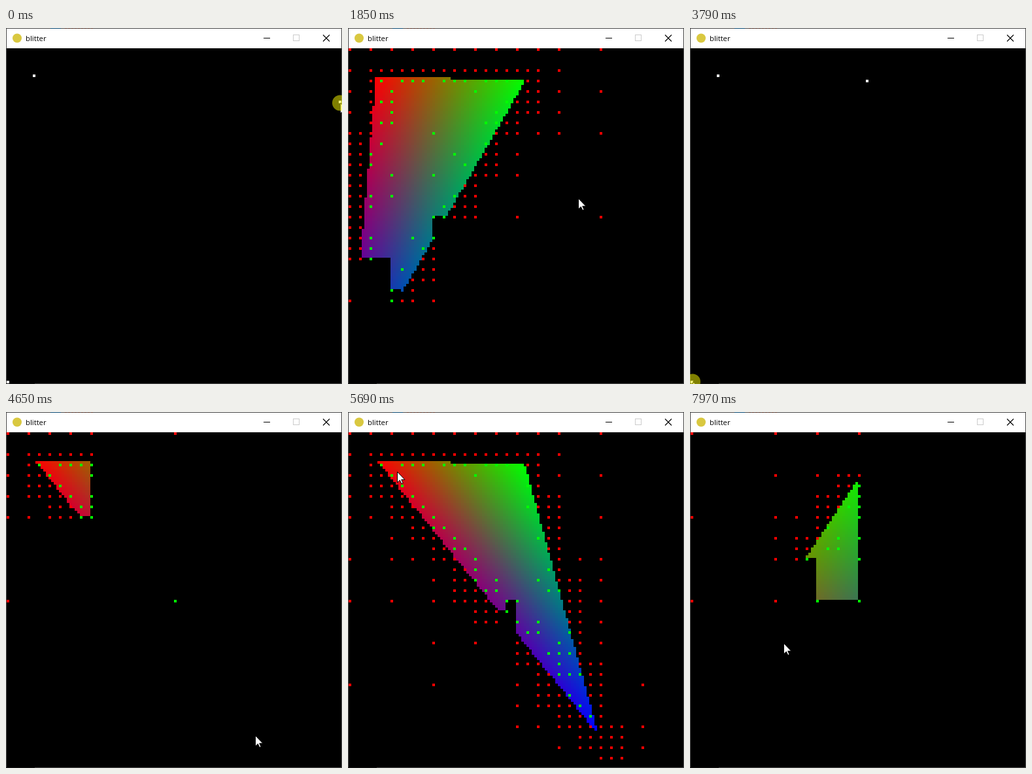
An HTML page with a canvas that plays this animation: 514x544 px, repeating every 7.99 s.

```html
<!DOCTYPE html>
<html lang="en">
<head>
<meta charset="utf-8">
<title>blitter</title>
<style>
  html, body { margin: 0; width: 514px; height: 544px; overflow: hidden; background: #000; }
  svg, canvas { position: absolute; left: 0; top: 0; display: block; }
  text { font: 11.3px "Open Sans", "Noto Sans", sans-serif; }
</style>
</head>
<body>
<svg width="514" height="544" shape-rendering="crispEdges">
  <rect width="514" height="544" fill="#484848"/>
  <rect x="68" width="16" height="1" fill="#0b4a74"/>
  <path d="M90 .5H135" stroke="#5a3326" stroke-dasharray="3 2"/>
  <rect x="1" y="1" width="512" height="30" fill="#fff"/>
  <rect x="1" y="31" width="512" height="512" fill="#000"/>
  <rect y="543" width="44" height="1" fill="#161616"/>
  <circle cx="17" cy="15.5" r="7" fill="#d9c840" shape-rendering="auto"/>
  <text x="30" y="20" shape-rendering="auto">blitter</text>
  <path d="M394 15.5h10" stroke="#000"/>
  <rect x="439.5" y="10.5" width="9" height="9" fill="none" stroke="#ccc"/>
  <path d="M485 10.5l10 10m0-10l-10 10" stroke="#000" stroke-width="1.1" shape-rendering="auto"/>
</svg>
<canvas id="stage" width="514" height="544"></canvas>
<script>
const LOOP = 7990, GRID = 128, LEAF = 4, CELL = 4;
const ctx = document.getElementById('stage').getContext('2d');
const arrow = new Path2D('M.5 .5V16.8L4.3 13.2L6.9 18.6L9.1 17.6L6.7 12.3H11.8Z');

// Pointer tip: time, x, y
const pointer = [
  [0, 511, 114], [270, 511, 114], [640, 300, 76], [790, 270, 81],
  [1100, 270, 81], [1850, 352, 260], [2510, 91, 492], [2730, 1, 540],
  [3010, 1, 540], [3270, 3, 540], [3560, 3, 540], [3570, 4, 540],
  [3870, 4, 540], [4330, 381, 494], [4700, 381, 494], [5690, 75, 91],
  [6050, 50, 77], [6240, 44, 71], [6500, 44, 71], [6520, 43, 72],
  [6870, 43, 72], [7750, 51, 413], [7779, 51, 413], [7970, 143, 353], [7990, 149, 351]
];

// Each shot: a corner is dragged, then the triangle is rasterised.
// marks pace the traversal: number of visited blocks, time
const shots = [
  { press: 0, release: 925, drag: 1, tri: [[10, 10], [67, 12], [0, 127]], marks: [[224, 1850]] },
  { press: 3790, release: 4465, drag: 2, tri: [[10, 10], [67, 12], [95, 115]], marks: [[51, 4650], [332, 5690]] },
  { press: 6760, release: 7779, drag: 0, tri: [[12, 95], [67, 12], [95, 115]], marks: [[48, 7970]] }
];

function slope(i, k) {
  const p = pointer[i - 1], q = pointer[i], r = pointer[i + 1];
  if (!p || !r) return 0;
  const still = (a, b) => a[1] === b[1] && a[2] === b[2];
  return still(p, q) || still(q, r) ? 0 : (r[k] - p[k]) / (r[0] - p[0]);
}

function pointerAt(t) {
  let i = 0;
  while (i < pointer.length - 2 && pointer[i + 1][0] <= t) i++;
  const a = pointer[i], b = pointer[i + 1], d = b[0] - a[0], u = (t - a[0]) / d;
  return [1, 2].map(k => Math.round(
    a[k] + (b[k] - a[k]) * u * u * (3 - 2 * u) +
    slope(i, k) * d * u * (1 - u) * (1 - u) -
    slope(i + 1, k) * d * u * u * (1 - u)));
}

const cross = (a, b, x, y) => (b[0] - a[0]) * (y - a[1]) - (b[1] - a[1]) * (x - a[0]);

// Visits the quadtree clockwise and lists what every block paints.
function traverse([a, b, c]) {
  const area = cross(a, b, ...c), nodes = [];
  const weights = (x, y) => [cross(b, c, x, y), cross(c, a, x, y), cross(a, b, x, y)].map(w => w / area);
  const inside = w => w.every(v => v > 1e-9);

  function visit(x, y, s) {
    const corners = [[x, y], [x + s, y], [x + s, y + s], [x, y + s]];
    const ws = corners.map(p => weights(...p));
    const node = {
      dots: corners.map((p, i) => [...p, inside(ws[i]) ? '#0f0' : '#f00']),
      cells: []
    };
    nodes.push(node);
    if ([0, 1, 2].some(e => ws.every(w => w[e] <= 1e-9))) return;
    if (s === LEAF || ws.every(inside)) {
      for (let j = y; j < y + s; j++) for (let i = x; i < x + s; i++) {
        const w = weights(i, j);
        if (inside(w)) node.cells.push([i, j, `rgb(${w.map(v => Math.round(v * 255))})`]);
      }
      return;
    }
    const h = s / 2;
    visit(x, y, h);
    visit(x + h, y, h);
    visit(x + h, y + h, h);
    visit(x, y + h, h);
  }
  visit(0, 0, GRID);
  return nodes;
}

// A block costs a fixed time plus a little per painted cell.
function schedule(shot) {
  let sum = 0;
  const nodes = traverse(shot.tri);
  const cost = nodes.map(n => sum += 2.875 + 0.0955 * n.cells.length);
  const stops = [[0, shot.release], ...shot.marks.map(([n, t]) => [cost[n - 1], t - 0.5])];
  nodes.forEach((n, i) => {
    const k = stops.findIndex(s => s[0] >= cost[i]);
    const [c0, t0] = stops[k < 0 ? stops.length - 1 : k - 1];
    const rate = k < 0 ? 1 : (stops[k][1] - t0) / (stops[k][0] - c0);
    n.time = t0 + (cost[i] - c0) * rate;
  });
  shot.nodes = nodes;
}
shots.forEach(schedule);

function cell([x, y, color]) {
  if (x >= GRID || y >= GRID) return;
  ctx.fillStyle = color;
  ctx.fillRect(1 + x * CELL, 31 + y * CELL, CELL, CELL);
}

const toCell = (v, origin) => Math.max(0, Math.min(GRID - 1, Math.floor((v - origin) / CELL)));

function draw(t) {
  const shot = shots.filter(s => s.press <= t).pop();
  const [px, py] = pointerAt(t), held = t < shot.release;
  ctx.clearRect(0, 0, 514, 544);
  if (held) {
    shot.tri.forEach((p, i) => {
      const [x, y] = i === shot.drag ? [toCell(px, 1), toCell(py, 31)] : p;
      cell([x, y, '#fff']);
    });
  } else {
    for (const n of shot.nodes) {
      if (n.time > t) break;
      n.dots.forEach(cell);
      n.cells.forEach(cell);
    }
  }
  ctx.save();
  ctx.translate(px, py);
  ctx.fillStyle = '#fff';
  ctx.strokeStyle = '#000';
  ctx.fill(arrow);
  ctx.stroke(arrow);
  ctx.restore();
  if (held) {
    ctx.fillStyle = 'rgba(255,255,0,.5)';
    ctx.beginPath();
    ctx.arc(px, py + 0.5, 12, 0, 2 * Math.PI);
    ctx.fill();
  }
}

const start = performance.now();
function tick() {
  draw((performance.now() - start) % LOOP);
  requestAnimationFrame(tick);
}
tick();
</script>
</body>
</html>
```
